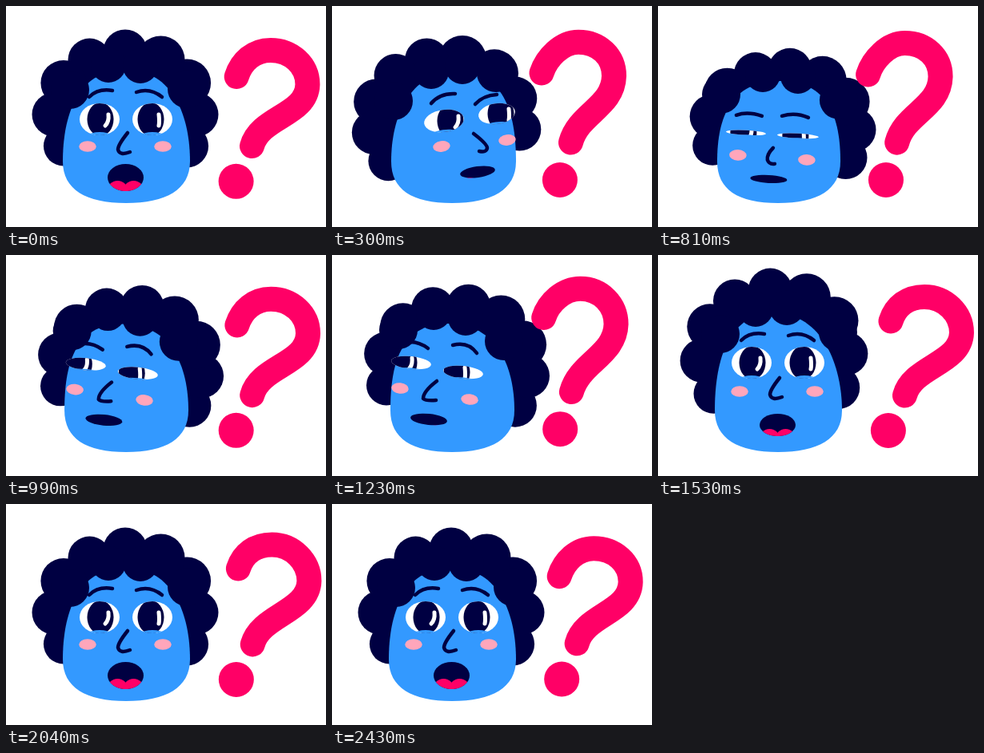
Animation of 400x277 px, one loop 2.46 s. Source, as an HTML page with a canvas:

```html
<!DOCTYPE html>
<html lang="en">
<head>
<meta charset="utf-8">
<title>Wondering face</title>
<style>
  html, body { margin: 0; width: 100%; height: 100%; overflow: hidden; background: #fff; }
  canvas { display: block; }
</style>
</head>
<body>
<canvas id="stage" width="400" height="277"></canvas>
<script>
const ctx = document.getElementById('stage').getContext('2d');
const NAVY = '#000042', BLUE = '#3399ff', PINK = '#ff0066', BLUSH = '#ffa6bb', WHITE = '#fff';
const LOOP = 2460, SWING = LOOP / 5, DEG = Math.PI / 180;
const CURLS = [27, 27.5, 30, 30, 27.5, 27, 28.5, 27.5, 25]; // radii, from right to left

const lift = (points, dy) => points.map((v, i) => i % 2 ? v - dy : v);

// hair: centre x, y, radii, middle angle, spacing    face: left, right, top x, top y
// eye: x, y, radii, iris shift                       mouth: x, y, radii
const front = {
  hair: [149, 136, 89, 79, 90, 30],
  fringe: [80, 105, 128, 74, 168, 75, 226, 104],
  face: [71, 230, 149, 80],
  eyeL: [117, 142, 25, 20, 1], eyeR: [183, 142, 25, 20, -2],
  browL: [104, 114, 115, 103, 133, 106], browR: [163, 108, 180, 102, 195, 114],
  nose: [152, 159, 140, 174, 140, 180, 142, 188, 155, 183],
  cheeks: [102, 176, 196, 176],
  mouth: [149.5, 215, 22.5, 17], tilt: [0]
};
const bounce = {
  ...front,
  hair: [145, 128, 90, 84, 93, 30],
  fringe: [78, 99, 122, 68, 161, 66, 225, 97],
  face: [71, 230, 145, 73],
  eyeL: [117, 135, 25, 20, 1], eyeR: [183, 135, 25, 20, -2],
  browL: lift(front.browL, 7), browR: lift(front.browR, 7),
  nose: lift(front.nose, 5), cheeks: lift(front.cheeks, 5),
  mouth: [149.5, 213, 22.5, 14]
};
const right = {
  hair: [143, 145, 92, 80, 105.5, 28.1],
  fringe: [77, 119, 124, 82, 163, 76, 205, 84],
  face: [74, 230, 157, 82],
  eyeL: [140, 144, 25, 14, 8], eyeR: [206, 135, 23, 13, 5],
  browL: [124, 122, 135, 109, 154, 110], browR: [179, 123, 189, 112, 206, 111],
  nose: [177, 160, 194, 173, 194, 178, 193, 184, 184, 182],
  cheeks: [137, 176, 219, 168],
  mouth: [182, 208, 22, 7], tilt: [-8]
};
const squint = {
  hair: [155, 155, 90, 75, 83.7, 27.9],
  fringe: [79, 111, 131, 86, 175, 88, 226, 118],
  face: [74, 228, 152, 94],
  eyeL: [110, 159, 25, 3, -3], eyeR: [175, 163, 26, 3, -3],
  browL: [98, 137, 112, 132, 130, 138], browR: [155, 138, 172, 133, 188, 140],
  nose: [144, 178, 136, 186, 137, 193, 139, 199, 146, 198],
  cheeks: [100, 187, 186, 193],
  mouth: [138.5, 217, 23, 5], tilt: [3]
};
const left = {
  hair: [155, 143, 90, 80, 80, 28.7],
  fringe: [83, 94, 127, 72, 167, 79, 215, 108],
  face: [73, 228, 145, 86],
  eyeL: [99, 135, 25, 8, -9], eyeR: [164, 147, 25, 8, -8],
  browL: [84, 112, 103, 104, 120, 117], browR: [151, 113, 170, 108, 181, 123],
  nose: [131, 158, 114, 171, 114, 180, 117, 183, 130, 182],
  cheeks: [85, 167, 172, 181],
  mouth: [121, 206, 23, 7], tilt: [6]
};

const smooth = u => u * u * (3 - 2 * u);
const easeIn = u => u * u;
const easeOut = u => u * (2 - u);
const keys = [
  [0, front], [90, front], [260, right, smooth], [540, right],
  [810, squint, easeIn], [1060, left, easeOut], [1260, left],
  [1500, bounce, smooth], [1620, bounce], [1950, front, smooth], [LOOP, front]
];

function poseAt(t) {
  const i = keys.findIndex(k => k[0] > t);
  const [t0, from] = keys[i - 1], [t1, to, ease = smooth] = keys[i];
  const u = ease((t - t0) / (t1 - t0)), pose = {};
  for (const part in from) pose[part] = from[part].map((v, j) => v + (to[part][j] - v) * u);
  return pose;
}

function oval(x, y, rx, ry, color, tilt = 0) {
  ctx.beginPath();
  ctx.ellipse(x, y, rx, ry, tilt, 0, 2 * Math.PI);
  ctx.fillStyle = color;
  ctx.fill();
}

function stroke(width, color) {
  ctx.lineWidth = width;
  ctx.strokeStyle = color;
  ctx.stroke();
}

// Line through quadratic curves: start, then control and end pairs
function curve(p) {
  ctx.beginPath();
  ctx.moveTo(p[0], p[1]);
  for (let i = 2; i < p.length; i += 4) ctx.quadraticCurveTo(p[i], p[i + 1], p[i + 2], p[i + 3]);
  stroke(4.5, NAVY);
}

function drawHair([x, y, rx, ry, middle, spacing]) {
  oval(x, y, rx, ry, NAVY);
  CURLS.forEach((r, i) => {
    const a = (middle + (i - 4) * spacing) * DEG;
    oval(x + rx * Math.cos(a), y - ry * Math.sin(a), r, r, NAVY);
  });
}

function drawFace([l, r, x, y]) {
  ctx.beginPath();
  ctx.moveTo(l, 195);
  ctx.bezierCurveTo(l, 140, x - 61, y, x, y);
  ctx.bezierCurveTo(x + 61, y, r, 140, r, 195);
  ctx.bezierCurveTo(r, 230, 200, 247, 150, 247);
  ctx.bezierCurveTo(100, 247, l, 230, l, 195);
  ctx.fillStyle = BLUE;
  ctx.fill();
}

function drawFringe(f) {
  for (let i = 0; i < 8; i += 2) {
    const r = i === 0 || i === 6 ? 24 : 22;
    oval(f[i], f[i + 1], r, r, NAVY);
  }
}

function drawEye([x, y, rx, ry, shift], tilt, lean) {
  ctx.save();
  oval(x, y, rx, ry, WHITE, tilt);
  ctx.clip();
  const iris = x + shift;
  oval(iris, y, 16.5, 21, NAVY);
  ctx.beginPath();
  ctx.moveTo(iris + 10, y - 6);
  ctx.quadraticCurveTo(iris + 11, y + 3, iris + 10 - lean, y + 8);
  stroke(5, WHITE);
  oval(x, y + 1.6 * ry, rx, 0.8 * ry, BLUE, tilt); // lower lid
  ctx.restore();
}

function drawMouth([x, y, rx, ry], tilt) {
  ctx.save();
  oval(x, y, rx, ry, NAVY, tilt);
  ctx.clip();
  const drop = 17 + (17 - ry) * 0.3;
  for (const side of [-10, 10]) oval(x + side, y + drop, 13, 13, PINK);
  ctx.restore();
}

function drawHead(p) {
  const tilt = p.tilt[0] * DEG;
  drawHair(p.hair);
  drawFace(p.face);
  drawFringe(p.fringe);
  const [lx, ly, rx, ry] = p.cheeks;
  oval(lx, ly, 10.8, 6.8, BLUSH, tilt);
  oval(rx, ry, 10.8, 6.8, BLUSH, tilt);
  drawEye(p.eyeL, tilt, 4);
  drawEye(p.eyeR, tilt, 0);
  [p.browL, p.browR, p.nose].forEach(curve);
  drawMouth(p.mouth, tilt);
}

function drawQuestion(t) {
  const a = (t - 50) / SWING * 2 * Math.PI, c = Math.cos(a), s = Math.sin(a);
  const startX = 276.5 + 14.5 * c, startY = 83.5 - 8.5 * s;
  const topX = 320.5 + 12.5 * c, topY = 48.8 + 4 * c - 5.7 * s;
  const sideX = 366 + 13.5 * c, sideY = 92.5 + 5 * c - 3 * s;
  const endX = 303.5 + 5 * c, endY = 173.5 + 2.5 * c;
  ctx.beginPath();
  ctx.moveTo(startX, startY);
  ctx.bezierCurveTo(startX + 6, startY - 19, topX - 21, topY, topX, topY);
  ctx.bezierCurveTo(topX + 26, topY, sideX, sideY - 24, sideX, sideY);
  ctx.bezierCurveTo(sideX - 1, sideY + 39, endX + 10, endY - 37, endX, endY);
  stroke(31, PINK);
  oval(286.4 + 1.5 * c, 219 + c, 22, 22, PINK);
}

function frame() {
  const t = performance.now() % LOOP;
  ctx.fillStyle = WHITE;
  ctx.fillRect(0, 0, 400, 277);
  drawHead(poseAt(t));
  drawQuestion(t);
  requestAnimationFrame(frame);
}

ctx.lineCap = ctx.lineJoin = 'round';
frame();
</script>
</body>
</html>
```
